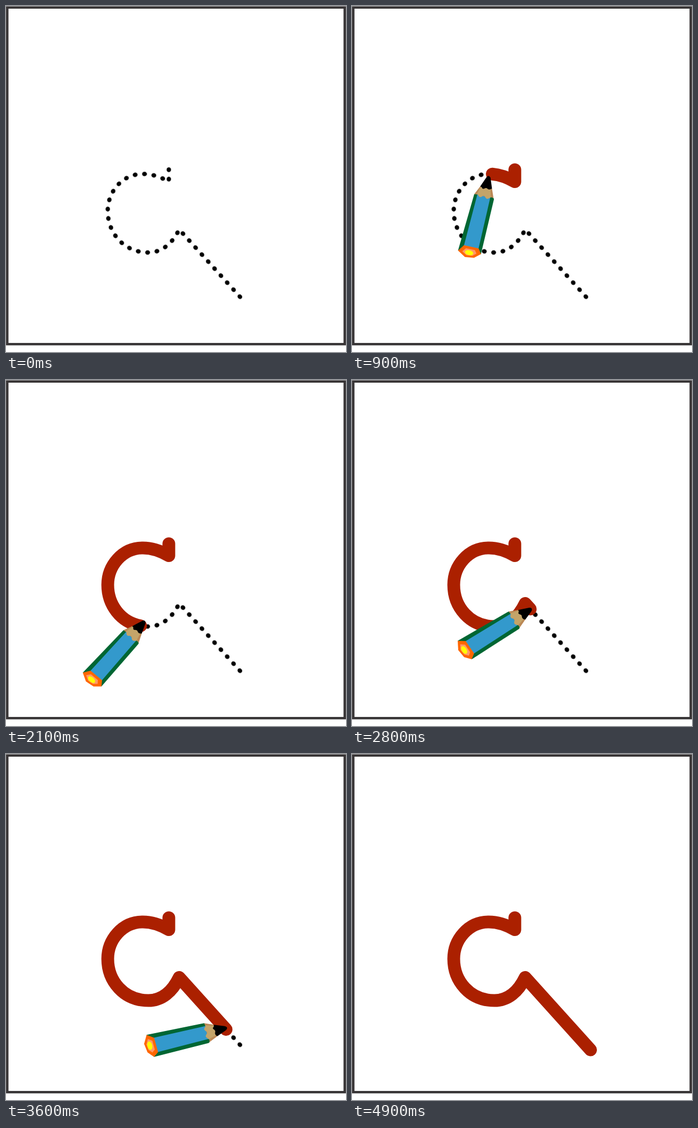
Animation of 640x652 px, one loop 5300 ms. Source, as an HTML page:

```html
<!DOCTYPE html>
<html lang="en">
<head>
<meta charset="utf-8">
<title>Tracing a stroke</title>
<style>
html, body { margin: 0; width: 100%; height: 100%; overflow: hidden; background: #fff; }
svg { display: block; width: 100vw; height: 100vh; }
</style>
</head>
<body>
<svg viewBox="0 0 640 652">
  <rect x="2.4" y="2.8" width="635.2" height="634.4" fill="#fff" stroke="#373435" stroke-width="4.5"/>
  <g id="dots" stroke="#999" stroke-width=".7"></g>
  <path id="line" fill="none" stroke="#ab2000" stroke-width="24" stroke-linecap="round" stroke-linejoin="round"
    d="M306.5 308.5V331C289 321 273 316.3 257 316.5C219 316.5 191.5 350 191.5 386C191.5 428 222 464.5 268 464.5C293 464.5 313 448 326 421L449 557.5"/>
  <!-- The pencil points along +x with its tip at the origin. -->
  <g id="pencil">
    <path fill="#006633" d="M-150.5-21.5L-40-17.8L-37-12V13L-38 18Q-38.5 20.5-41 20.5L-146.5 22Z"/>
    <path fill="#3399cc" d="M-139-13L-36-12V13L-138 15Z"/>
    <path fill="#bb8855" d="M-40-17.8L-23-10.5L-21.5 12L-39 19.5Q-36 15-40 12L-39-11Z"/>
    <path fill="#c4a469" d="M-39-13L-23-9L-21.5 9L-39 14Q-37 14-40 12Q-45 8-41 4Q-36 1-41-3Q-45-7-39-11Z"/>
    <path d="M-23-10.5L-4-3.5Q0-2 0 1Q-1 4-4 5L-21.5 12Q-26 8-24 4Q-22 1-25-2Q-28-5-24-7Z"/>
    <path fill="#ff6600" d="M-150.5-21.5L-138-13L-137 15L-146.5 22L-156.5 11L-159-6Z"/>
    <path fill="#ff9966" d="M-150-13.5L-142.5-8L-142 9L-147.5 13.5L-153.5 7L-155-4Z"/>
    <ellipse cx="-149.3" cy="-.3" rx="4.6" ry="8" fill="#ffff00"/>
  </g>
</svg>
<script>
const LOOP = 5300, STEP = 100, LAST = 49;
const TURN = 9, CORNER = 26, REST = 40;   // steps: pencil turns back, straight leg begins, pencil stops
const line = document.getElementById("line");
const pencil = document.getElementById("pencil");
const dots = document.getElementById("dots");

const leg = Math.hypot(123, 136.5);
const total = line.getTotalLength();
const corner = total - leg;
const hook = 67.6;   // length drawn when the pencil turns back

const clamp = u => Math.max(0, Math.min(1, u));
const mix = (a, b, u) => a + (b - a) * u;
const part = (n, from, to) => clamp((n - from) / (to - from));

// Steady along the hook and the curve, then easing into the straight leg.
function drawn(n) {
  if (n < TURN) return hook * part(n, 4.4, TURN);
  if (n < CORNER) return mix(hook, corner, part(n, TURN, CORNER));
  return corner + leg * part(n, CORNER, 38.7) ** 1.4;
}

function tilt(n) {
  return n < TURN ? mix(-40, -75.9, part(n, 1, TURN)) : mix(-75.9, -4.2, part(n, TURN, REST));
}

// How far the hand drifts from the end of the stroke: [step, dx, dy].
const drift = [[4, 1.5, 0], [TURN, -7, 3.4], [21, 8, -9.5], [28, 2.8, -1.2], [36, 2, -3.5], [REST, 5.5, -.5]];

function driftAt(n) {
  const i = Math.max(1, drift.findIndex(k => k[0] >= n));
  const [a, b] = n < REST ? [drift[i - 1], drift[i]] : drift.slice(-2);
  const u = part(n, a[0], b[0]);
  return [mix(a[1], b[1], u), mix(a[2], b[2], u)];
}

function addDots() {
  const past = 10.6, gap = (corner + past) / 22;
  for (let i = 0; i < 32; i++) {
    const s = i < 22 ? i * gap : corner + past + (i - 22) * 17.78;
    const p = line.getPointAtLength(s), q = line.getPointAtLength(s + .5);
    const dir = Math.atan2(q.y - p.y, q.x - p.x) * 180 / Math.PI;
    const dot = document.createElementNS("http://www.w3.org/2000/svg", "ellipse");
    dot.setAttribute("rx", 4.6);
    dot.setAttribute("ry", 4.2);
    dot.setAttribute("transform", `translate(${p.x} ${p.y}) rotate(${dir})`);
    dots.append(dot);
  }
}

function draw(ms) {
  const n = Math.min(LAST, Math.floor(ms / STEP));
  const s = drawn(n), end = line.getPointAtLength(s), [dx, dy] = driftAt(n);
  line.style.display = s > 0 ? "" : "none";
  line.setAttribute("stroke-dasharray", s < total ? `${s} 2000` : "none");
  pencil.setAttribute("transform", `translate(${end.x + dx} ${end.y + dy}) rotate(${tilt(n)})`);
  pencil.setAttribute("opacity", Math.min(part(n, 0, 4), 1 - part(n, REST, LAST)));
}

addDots();
const start = performance.now();
function tick() {
  draw((performance.now() - start) % LOOP);
  requestAnimationFrame(tick);
}
tick();
</script>
</body>
</html>
```
